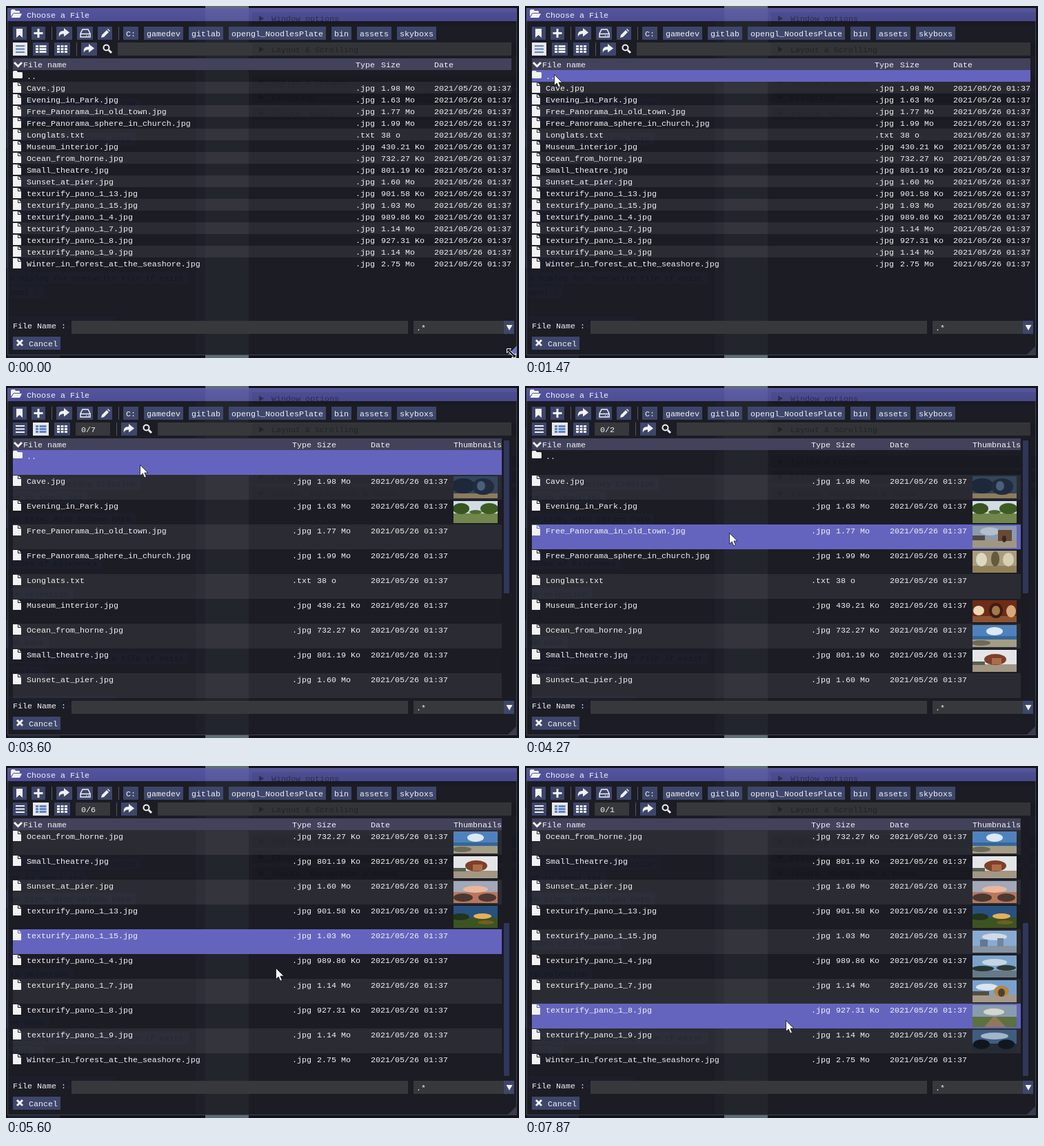
An HTML page for the animation above (8 s loop, 744x511 px).

```html
<!DOCTYPE html>
<html lang="en">
<head>
<meta charset="utf-8">
<title>Choose a File</title>
<style>
  html, body { margin: 0; width: 100%; height: 100%; overflow: hidden; background: #131419; }
  svg { display: block; }
  text { font: 11.667px "Liberation Mono", "DejaVu Sans Mono", monospace; fill: #f2f2f2; white-space: pre; }
  .ghost text { fill: #101116; opacity: .5; }
  .btn { fill: #3e466b; }
  .field { fill: #37383b; }
  .ico { fill: #f2f2f2; }
  .line { fill: none; stroke: #f2f2f2; stroke-width: 2; }
  .on .btn { fill: #e6e6ea; }
  .on .ico { fill: #5b82c4; }
  .over .btn { fill: #5867a8; }
</style>
</head>
<body>
<svg id="stage" width="744" height="511" viewBox="0 0 744 511">
  <defs>
    <clipPath id="body"><rect x="3" y="93" width="738" height="360"/></clipPath>
    <linearGradient id="bar" x2="0" y2="1"><stop stop-color="#55559f"/><stop offset="1" stop-color="#4d4d96"/></linearGradient>
  </defs>

  <!-- window over the dimmed desktop -->
  <rect width="744" height="511" fill="#131419"/>
  <path d="M289 0h63v3h-63zM289 507h63v4h-63z" fill="#5d6c75"/>
  <path d="M0 62h2v30H0zM0 180h2v26H0zM0 340h2v40H0zM3 507h75v4H3z" fill="#1e2130"/>
  <rect x="2" y="3" width="739" height="504" fill="#1b1c24"/>
  <rect x="276" y="22" width="13" height="484" fill="#1e1f28"/>
  <rect x="289" y="22" width="63" height="484" fill="#23252d"/>
  <rect x="2" y="3" width="739" height="19" fill="url(#bar)"/>
  <path d="M289 3h63v19h-63z" fill="#fff" opacity=".05"/>
  <rect x="2.500" y="3.500" width="738" height="503" fill="none" stroke="#6e6e80" stroke-opacity=".5"/>
  <path class="ico" transform="translate(7 5)" d="M0 10V1.500L1.500 0h4L7 2h5l1 1v2H4zM.500 12L4 6h12l-3 6z"/>

  <g id="chrome"></g>

  <!-- first toolbar row -->
  <path class="ico" d="M15 33h9v13l-4.500-4-4.500 4z"/>
  <path class="ico" d="M45.500 33h3v5h5v3h-5v5h-3v-5h-5v-3h5z"/>
  <path class="ico" id="share" d="M77 45c-1-6 1-9 7-9v-4l8 6.500-8 6v-4c-4 0-6 1-7 4.500z"/>
  <path class="line" style="stroke-width:1.500" d="M108 40l3-6h8l3 6v5h-14zM108 40.500h14M116 43h1m2 0h1"/>
  <path class="ico" d="M138 46l1-4 7-7 3 3-7 7zM147 34l1-1 3 3-1 1z"/>
  <path d="M66.500 30v19M163.500 30v19" stroke="#55565f"/>

  <!-- view buttons -->
  <g id="listBtn"><rect class="btn" x="10" y="53" width="21" height="19"/>
    <path class="ico" d="M14 57h13v2H14zM14 61.500h13v2H14zM14 66h13v2H14z"/></g>
  <g id="thumbBtn"><rect class="btn" x="39" y="53" width="23" height="19"/>
    <path class="ico" d="M43 57h4v3h-4zM48.500 57h10v3h-10zM43 61h4v3h-4zM48.500 61h10v3h-10zM43 65h4v3h-4zM48.500 65h10v3h-10z"/></g>
  <g><rect class="btn" x="70" y="53" width="23" height="19"/>
    <path class="ico" d="M74 57h4v3h-4zM79.500 57h4v3h-4zM85 57h4v3h-4zM74 61h4v3h-4zM79.500 61h4v3h-4zM85 61h4v3h-4zM74 65h4v3h-4zM79.500 65h4v3h-4zM85 65h4v3h-4z"/></g>
  <g id="counter"><rect class="field" x="101" y="53" width="50" height="19"/><text id="count" x="109" y="67"></text></g>
  <g id="search">
    <path d="M102.500 53v19" stroke="#55565f"/>
    <rect class="btn" x="109" y="53" width="23" height="19"/>
    <use href="#share" x="36" y="23"/>
    <circle class="line" cx="145.500" cy="60.500" r="4"/><path class="line" style="stroke-width:3" d="M149 64l4 4"/>
  </g>
  <rect class="field" id="query" y="53" height="19"/>

  <g class="ghost" id="ghost"></g>
  <g id="table"></g>

  <!-- footer -->
  <text x="10" y="468">File Name :</text>
  <rect class="field" x="95" y="457" width="488" height="19"/>
  <rect class="field" x="591" y="457" width="131" height="19"/>
  <rect class="btn" x="722" y="457" width="15" height="19"/>
  <path class="ico" d="M725.500 463h9l-4.500 8z"/>
  <text x="595" y="471">.*</text>
  <rect class="btn" x="10" y="480" width="69" height="19"/>
  <path class="line" style="stroke-width:3" d="M16 485l8 8M24 485l-8 8"/>
  <text x="33" y="494">Cancel</text>
  <path id="grip" d="M741 493v13h-13z"/>

  <g id="tip">
    <rect x="65.500" y="66.500" width="120" height="27" fill="#16161a" stroke="#4a4a54"/>
    <text x="73" y="84">Thumbnails List</text>
  </g>
  <path id="arrow" d="M.500.500v16l3.700-3.500 2.600 6 2.600-1.100-2.500-5.900h5.100z" fill="#fff" stroke="#111" stroke-width=".8"/>
  <path id="resize" d="M726.500 497.500h6l-2 2 7 7 2-2v6h-6l2-2-7-7-2 2z" fill="#111" stroke="#fff"/>
</svg>

<script>
const $ = id => document.getElementById(id);
const rect = (x, y, w, h, fill) => `<rect x="${x}" y="${y}" width="${w}" height="${h}" fill="${fill}"/>`;
const text = (x, y, s) => `<text x="${x}" y="${y}">${s}</text>`;
const button = (x, y, w) => `<rect class="btn" x="${x}" y="${y}" width="${w}" height="19"/>`;

// Toolbar boxes and path crumbs
let crumbs = button(10, 30, 20) + button(37, 30, 20) + button(73, 30, 23) + button(103, 30, 23) + button(133, 30, 21);
let crumbX = 170;
for (const part of ['C:', 'gamedev', 'gitlab', 'opengl_NoodlesPlate', 'bin', 'assets', 'skyboxs']) {
  const w = part.length * 7 + 8;
  crumbs += button(crumbX, 30, w) + text(crumbX + 4, 44, part);
  crumbX += w + 8;
}
$('chrome').innerHTML = text(30, 17, 'Choose a File') + crumbs;

// Faint demo window showing through
const sections = { 22: 'Window options', 67: 'Layout &amp; Scrolling', 114: 'Tables &amp; Columns', 136: 'Filtering', 160: 'Inputs, Navigation &amp; Focus' };
const demo = { 146: '        Directory Creation', 166: 'ed in imgui.ini', 197: 'on Size, Hide Column Date', 261: 'tions of Filenames', 306: 'te selection', 376: 'on pane', 399: 'n Dialog for Overwrite File if exist', 419: 'emo) :', 463: '           of a range' };
$('ghost').innerHTML =
  Object.entries(sections).map(([y, s]) => rect(357, y - 13, 384, 18, 'rgba(0,0,0,.07)') +
    `<path d="M367 ${y - 8}l7 4-7 4z" fill="#101116" opacity=".5"/>` + text(385, y, s)).join('') +
  Object.entries(demo).map(([y, s]) => rect(3, y - 13, s.length * 7 + 10, 18, 'rgba(60,70,130,.06)') + text(6, y, s)).join('');

// Thumbnail scenes, 64 x 32
const land = (sky, ground, y) => rect(0, 0, 64, 32, sky) + rect(0, y, 64, 32, ground);
const oval = (x, y, rx, ry, c) => `<ellipse cx="${x}" cy="${y}" rx="${rx}" ry="${ry}" fill="${c}"/>`;
const scenes = {
  cave: land('#33465c', '#8d7b5c', 25) + oval(14, 14, 17, 11, '#1d2838') + oval(43, 15, 16, 12, '#222c3c') + oval(40, 14, 6, 7, '#47617d'),
  park: land('#d3dce5', '#72854c', 18) + oval(11, 11, 12, 8, '#385420') + oval(52, 11, 13, 8, '#3d5c22') + oval(32, 16, 9, 3, '#4d6932'),
  town: land('#8c9aaf', '#a09684', 20) + oval(25, 8, 14, 6, '#b4bfcd') + rect(37, 6, 20, 16, '#674934') + oval(46, 19, 3, 5, '#332720') + rect(0, 14, 18, 7, '#4f4a48'),
  church: land('#a99d7d', '#8f8058', 22) + oval(13, 13, 8, 10, '#ddd8c2') + oval(33, 12, 6, 11, '#665a3c') + oval(52, 13, 8, 10, '#d5cfb6'),
  museum: land('#6e2c15', '#8e5230', 23) + oval(9, 15, 8, 7, '#ecd8b6') + oval(34, 15, 10, 11, '#3a1d12') + oval(34, 15, 6, 7, '#a5794d') + oval(56, 16, 7, 9, '#d7aa79'),
  ocean: land('#4f82bd', '#a59c86', 21) + rect(0, 16, 64, 5, '#356798') + oval(32, 9, 12, 6, '#dce8f5') + oval(12, 26, 14, 4, '#6d6b58'),
  theatre: land('#e3e5e7', '#a29684', 21) + oval(33, 14, 16, 8, '#7d4028') + rect(28, 12, 14, 9, '#ad6c4a') + rect(0, 17, 18, 5, '#58604e'),
  pier: land('#a2a8b8', '#b8775c', 16) + oval(32, 12, 18, 5, '#eab69d') + oval(14, 24, 14, 6, '#493830') + oval(49, 24, 13, 6, '#4c3931'),
  dusk: land('#28517f', '#3c541f', 17) + oval(42, 15, 13, 4, '#e3b05d') + oval(10, 16, 13, 5, '#20351b') + oval(47, 24, 12, 3, '#735c27'),
  plaza: land('#8aabd0', '#8795a5', 22) + oval(32, 9, 18, 5, '#d0dbe8') + rect(11, 13, 11, 10, '#63778f') + rect(36, 11, 9, 12, '#72859a'),
  lake: land('#7ca2ca', '#677987', 22) + oval(32, 10, 18, 5, '#c4d5e4') + oval(15, 19, 16, 4, '#263532') + oval(49, 18, 14, 4, '#2c3a34'),
  arch: land('#7aa2cf', '#a69987', 21) + oval(21, 10, 16, 5, '#dce5ed') + oval(42, 16, 11, 8, '#b48642') + oval(42, 18, 5, 6, '#4e402b') + rect(0, 16, 24, 6, '#514f43'),
  field: land('#899cad', '#5c7042', 17) + oval(31, 10, 15, 5, '#d3d5ce') + '<path d="M30 17h4l14 15H17z" fill="#92785a"/>',
  night: land('#405d80', '#242b34', 20) + oval(32, 9, 20, 5, '#a1b5cd') + oval(13, 21, 12, 7, '#10161d') + oval(49, 21, 12, 7, '#11171f')
};

// name, size, scene, time its thumbnail is ready
const files = [
  ['..'],
  ['Cave.jpg', '1.98 Mo', 'cave', 3330],
  ['Evening_in_Park.jpg', '1.63 Mo', 'park', 3530],
  ['Free_Panorama_in_old_town.jpg', '1.77 Mo', 'town', 3730],
  ['Free_Panorama_sphere_in_church.jpg', '1.99 Mo', 'church', 3870],
  ['Longlats.txt', '38 o'],
  ['Museum_interior.jpg', '430.21 Ko', 'museum', 4000],
  ['Ocean_from_horne.jpg', '732.27 Ko', 'ocean', 4130],
  ['Small_theatre.jpg', '801.19 Ko', 'theatre', 4270],
  ['Sunset_at_pier.jpg', '1.60 Mo', 'pier', 4670],
  ['texturify_pano_1_13.jpg', '901.58 Ko', 'dusk', 5200],
  ['texturify_pano_1_15.jpg', '1.03 Mo', 'plaza', 5730],
  ['texturify_pano_1_4.jpg', '989.86 Ko', 'lake', 6270],
  ['texturify_pano_1_7.jpg', '1.14 Mo', 'arch', 6800],
  ['texturify_pano_1_8.jpg', '927.31 Ko', 'field', 7330],
  ['texturify_pano_1_9.jpg', '1.14 Mo', 'night', 7870],
  ['Winter_in_forest_at_the_seashore.jpg', '2.75 Mo']
];

// Pointer path: time, x, y
const path = [
  [0, 733, 503], [70, 715, 492], [870, 244, 218], [1200, 50, 62], [1270, 46, 70], [1390, 42, 99],
  [1480, 42, 99], [1730, 45, 125], [1870, 44, 103], [2000, 44, 103], [2530, 42, 63], [2890, 42, 63],
  [3130, 160, 106], [3470, 160, 106], [3600, 192, 112], [4130, 296, 213], [4400, 296, 213], [4730, 391, 255],
  [5535, 391, 255], [5600, 391, 293], [5667, 381, 347], [5735, 378, 356], [5800, 378, 356], [6070, 378, 369]
];
const LOOP = 8000, STEP = 1000 / 15, TOP = 93;
const clamp = v => Math.min(1, Math.max(0, v));

function pointer(t) {
  const i = path.findIndex(p => p[0] > t);
  if (i < 0) return path[path.length - 1].slice(1);
  if (i === 0) return path[0].slice(1);
  const [t0, x0, y0] = path[i - 1], [t1, x1, y1] = path[i];
  const k = (t - t0) / (t1 - t0);
  return [Math.round(x0 + (x1 - x0) * k), Math.round(y0 + (y1 - y0) * k)];
}

const PAGE = 'M0 0h7v5h5v10H0zM8 0l4 4H8z';
const FOLDER = 'M0 1.500Q0 0 1.500 0h4L7 2h5.500Q14 2 14 3.500v6q0 1.500-1.500 1.500h-11Q0 11 0 9.500z';

function table(t, thumbs, scroll, hover) {
  const h = thumbs ? 36 : 17, w = thumbs ? 709 : 723;
  const [type, size, date] = thumbs ? [415, 451, 529] : [507, 544, 621];
  let rows = '';
  files.forEach(([name, bytes, scene, ready], i) => {
    const y = TOP + i * h - scroll;
    if (y + h <= TOP || y >= 453) return;
    if (i === hover) rows += rect(10, y, w, h, '#6464bf');
    else if (i % 2) rows += rect(10, y, w, h, 'rgba(255,255,255,.07)');
    rows += `<path class="ico" transform="translate(10 ${y + 1})" d="${i ? PAGE : FOLDER}"/>` + text(30, y + 13, name);
    if (i) rows += text(type, y + 13, name.slice(-4)) + text(size, y + 13, bytes) + text(date, y + 13, '2021/05/26 01:37');
    if (thumbs && ready <= t) rows += `<svg x="649" y="${y + 2}" width="64" height="32">${scenes[scene]}</svg>`;
  });
  let out = `<g clip-path="url(#body)">${rows}</g>` + rect(10, 76, w, 17, '#42425b') +
    '<path class="line" style="stroke-width:3" d="M12 82l5.500 5.500 5.500-5.500"/>' +
    text(25, 89, 'File name') + text(type, 89, 'Type') + text(size, 89, 'Size') + text(date, 89, 'Date');
  if (thumbs) {
    out += text(649, 89, 'Thumbnails') + rect(719, 76, 14, 377, '#1a1b23') +
      `<rect x="722" y="${79 + scroll * 149 / 252}" width="8" height="222" rx="1" fill="#30375a"/>`;
  }
  return out;
}

function draw(t) {
  const thumbs = t >= 2860;
  const scroll = Math.round(clamp((t - 4800) / 530) * 7) * 36;
  const [x, y] = pointer(t);
  const [hx, hy] = pointer(t - STEP);   // highlight trails the pointer by one step
  const inside = hy >= TOP && hy < 453 && hx >= 10 && hx < 719;
  const hover = inside && t > 70 ? Math.floor((hy - TOP + scroll) / (thumbs ? 36 : 17)) : -1;
  const onThumb = hx >= 39 && hx < 62 && hy >= 53 && hy < 72;

  $('table').innerHTML = table(t, thumbs, scroll, hover);
  $('listBtn').setAttribute('class', thumbs ? '' : 'on');
  $('thumbBtn').setAttribute('class', thumbs ? 'on' : onThumb ? 'over' : '');
  const shift = thumbs ? 58 : 0;
  $('search').setAttribute('transform', `translate(${shift})`);
  $('query').setAttribute('x', 162 + shift);
  $('query').setAttribute('width', 571 - shift);

  const done = files.filter(f => f[3] <= t).length;
  $('counter').style.display = thumbs ? '' : 'none';
  $('count').textContent = '0/' + Math.min(8, (scroll ? 15 : 9) - done);

  const resizing = t < 65;
  $('tip').style.display = t >= 2725 && t < 2960 ? '' : 'none';
  $('grip').setAttribute('fill', resizing ? '#7474c4' : '#3a3b4c');
  $('resize').style.display = resizing ? '' : 'none';
  $('arrow').style.display = resizing ? 'none' : '';
  $('arrow').setAttribute('transform', `translate(${x} ${y})`);
}

// The screen refreshes 15 times a second, on whole hundredths
let last = -1;
function frame() {
  const step = Math.floor((performance.now() % LOOP + 5) / STEP);
  if (step !== last) {
    last = step;
    draw(Math.ceil(step * STEP / 10) * 10);
  }
  requestAnimationFrame(frame);
}
frame();
</script>
</body>
</html>
```
